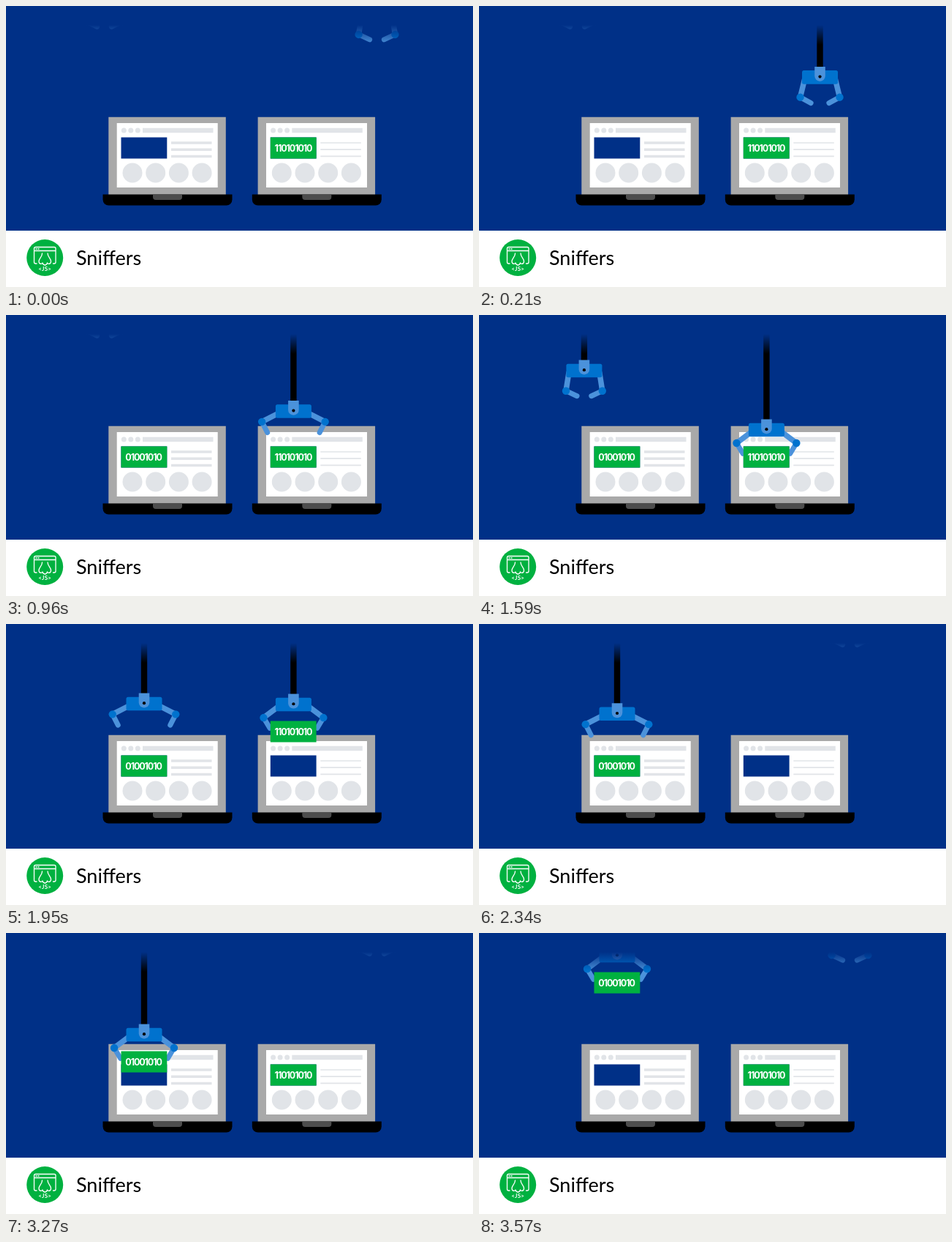
Animation, 639 px wide and 384 px high, one loop 3600 ms. Source, as an HTML page with a canvas:

```html
<!DOCTYPE html>
<html lang="en">
<head>
<meta charset="utf-8">
<title>Sniffers</title>
<style>
  html, body { margin: 0; width: 100%; height: 100%; overflow: hidden; background: #fff; }
  canvas { display: block; }
</style>
</head>
<body>
<canvas id="stage" width="639" height="384"></canvas>
<script>
const ctx = document.getElementById('stage').getContext('2d');
const LOOP = 3600, STEP = 30;
const NAVY = '#003087', GREEN = '#00b140', BLUE = '#0072ce', SKY = '#4b92db', PALE = '#e1e4e8';

// Times within one claw cycle, in ms
const LIFT_START = 1560, LIFT_END = 2160;
const LOCK_TIME = 870, TYPE_START = 270;

// Arm angles from the vertical, in degrees
const HANGING = { upper: 9, fore: 65 };
const SPREAD = { upper: 63, fore: 27 };
const GRIPPING = { upper: 53, fore: 31 };

const stations = [
  { x: 0, shift: 1440, parkX: 134.5, clawX: 189, code: '01001010', typeStep: 55, line: 3.5 },
  { x: 204.3, shift: 0, parkX: 507.5, clawX: 393.4, code: '110101010', typeStep: 45, line: 1.7 },
];

const mix = (a, b, p) => a + (b - a) * p;
const mod = (a, n) => ((a % n) + n) % n;
function ease(t, start, duration) {
  const u = Math.min(1, Math.max(0, (t - start) / duration));
  return (1 - Math.cos(Math.PI * u)) / 2;
}

function box(x, y, w, h, fill, radius = 0) {
  ctx.fillStyle = fill;
  ctx.beginPath();
  ctx.roundRect(x, y, w, h, radius);
  ctx.fill();
}
function disc(x, y, r, fill) {
  ctx.fillStyle = fill;
  ctx.beginPath();
  ctx.arc(x, y, r, 0, Math.PI * 2);
  ctx.fill();
}
function stroke(path, color, width) {
  ctx.strokeStyle = color;
  ctx.lineWidth = width;
  ctx.lineCap = ctx.lineJoin = 'round';
  ctx.stroke(new Path2D(path));
}
function label(text, x, y, font, color, spacing = 0, align = 'left') {
  ctx.font = font;
  ctx.fillStyle = color;
  ctx.letterSpacing = spacing + 'px';
  ctx.textAlign = align;
  ctx.fillText(text, x, y);
}

function drawLaptop({ x, line }) {
  ctx.save();
  ctx.translate(x, 0);
  box(140.3, 151.7, 160.5, 107, '#a9a9a9');
  box(151.7, 160, 138, 88, '#fff');
  box(132.5, 257.5, 177, 15, '#000', [0, 0, 8, 8]);
  box(201, 257.5, 40, 7.5, '#4d4d4d', [0, 0, 4, 4]);
  for (let i = 0; i < 3; i++) {
    disc(161.3 + i * 9.5, 170, 3.5, PALE);
    box(226, 187 + i * 9.2 - line / 2, 55.5, line, PALE);
  }
  box(187, 166.7, 96.5, 6.6, PALE);
  for (let i = 0; i < 4; i++) disc(173 + i * 31.7, 228, 13.5, PALE);
  box(157.5, 179.5, 62.8, 29, NAVY);
  ctx.restore();
}

function drawArm(side, pose) {
  const reach = (from, length, degrees) => {
    const a = degrees * Math.PI / 180;
    return [from[0] + side * length * Math.sin(a), from[1] + length * Math.cos(a)];
  };
  const shoulder = [side * 21, 3];
  const elbow = reach(shoulder, 25, pose.upper);
  const tip = reach(elbow, 16.6, -pose.fore);
  stroke(`M${shoulder}L${elbow}`, SKY, 7.5);
  stroke(`M${elbow}L${tip}`, SKY, 7);
  disc(...elbow, 5.2, BLUE);
}

function drawClaw(x, y, pose) {
  if (y > 20) box(x - 4.2, 20, 8.4, y - 30, '#000');
  ctx.save();
  ctx.translate(x, y);
  drawArm(-1, pose);
  drawArm(1, pose);
  box(-24.5, -9.3, 49, 18.6, BLUE, 2.5);
  box(-7.3, -14.5, 14.6, 20, SKY, [0, 0, 7.3, 7.3]);
  disc(0, -.8, 2.1, '#000');
  ctx.restore();
}

function clawState(c, { parkX, clawX }) {
  if (c >= LIFT_END) c = -200;
  const lift = c > LIFT_START ? 126 * ((c - LIFT_START) / 570) ** 2.6 : 0;
  const spread = ease(c, 150, 310), grip = ease(c, 1200, 200);
  const bend = key => mix(mix(HANGING[key], SPREAD[key], spread), GRIPPING[key], grip);
  return {
    x: mix(parkX, clawX, ease(c, 30, 440)),
    y: mix(-6.5, 109, ease(c, -100, 390)) + 48 * ease(c, 720, 500) - lift,
    lift,
    pose: { upper: bend('upper'), fore: bend('fore') },
  };
}

function drawFade() {
  const fade = ctx.createLinearGradient(0, 26, 0, 53);
  fade.addColorStop(0, NAVY);
  fade.addColorStop(1, 'rgba(0,48,135,0)');
  ctx.fillStyle = fade;
  ctx.fillRect(0, 0, 639, 53);
}

function drawCode({ x, code, typeStep }, sinceCut, lift) {
  const locked = sinceCut >= LOCK_TIME;
  if (locked) box(x + 157.5, 179.5 - lift, 62.8, 29, GREEN);
  const count = Math.max(0, Math.floor((sinceCut - TYPE_START) / typeStep));
  label(code.slice(0, count), x + 163.3, 198.7 - lift, '700 12.5px Inter, sans-serif', '#fff', -1.1);
}

function drawFooter() {
  box(0, 307, 639, 77, '#fff');
  disc(53.2, 344, 25, GREEN);
  stroke('M42 352H40.5Q38.5 352 38.5 350V331.5Q38.5 329.5 40.5 329.5H66Q68 329.5 68 331.5V350Q68 352 66 352H64.5M38.5 334.5H68M41 332H42M44 332H45', '#fff', 1.3);
  stroke('M49.5 338C49.5 343 45 345 45 349C45 353 49 353 50 351C51 355 55.5 355 56.5 351C57.5 353 61.5 353 61.5 349C61.5 345 57 343 57 338', '#fff', 1.3);
  label('<JS>', 53.2, 362, '700 8px Lato, sans-serif', '#fff', .2, 'center');
  label('Sniffers', 96, 354, '400 27px Lato, sans-serif', '#000');
}

function draw(now) {
  const t = Math.floor(now % LOOP / STEP) * STEP;
  box(0, 0, 639, 384, NAVY);
  stations.forEach(drawLaptop);
  const states = stations.map(station => {
    const c = mod(t - station.shift + 200, LOOP) - 200;
    const claw = clawState(c, station);
    drawClaw(claw.x, claw.y, claw.pose);
    return { sinceCut: mod(c - LIFT_END, LOOP), lift: claw.lift };
  });
  drawFade();
  stations.forEach((station, i) => drawCode(station, states[i].sinceCut, states[i].lift));
  drawFooter();
}

const start = performance.now();
function tick() {
  draw(performance.now() - start);
  requestAnimationFrame(tick);
}
tick();
</script>
</body>
</html>
```
